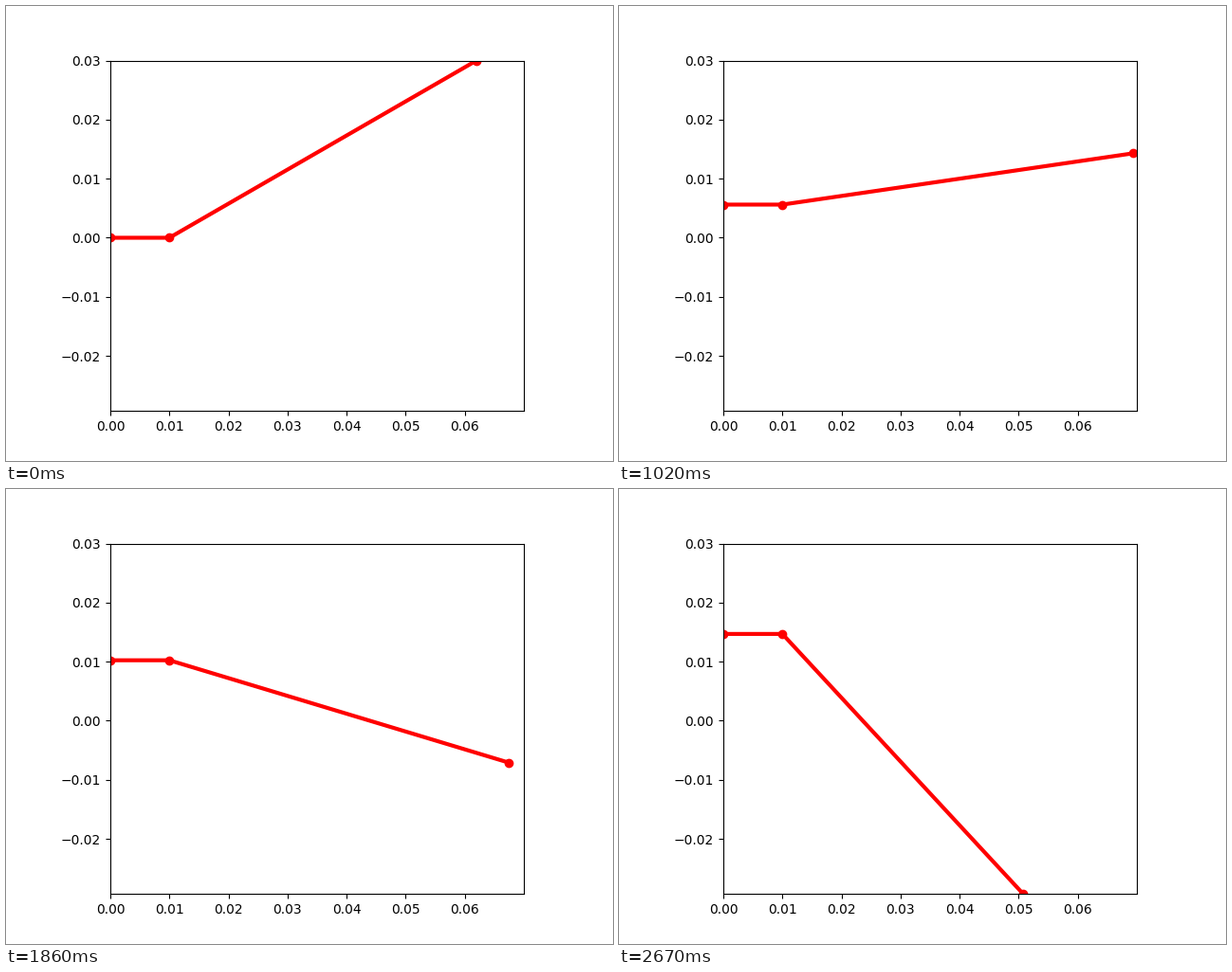
These frames come from a looping animation (640 px wide and 480 px high, 2.7 s). A matplotlib script:

```python
import numpy as np
import matplotlib.pyplot as plt
from matplotlib.animation import FuncAnimation
from matplotlib.ticker import MultipleLocator

FRAMES = 90
INTERVAL = 30          # ms

BASE = 0.01            # length of the level link
ROD = 0.06             # length of the swinging link
LIFT = 0.0001652       # rise of the level link per frame
START = 30.0           # rod angle in degrees
SPIN = 0.4955          # angular speed, degrees per frame
GAIN = 0.00418         # half the angular acceleration


def joints(k):
    """Coordinates of the three joints at frame k."""
    height = LIFT * k
    angle = np.radians(START - SPIN * k - GAIN * k ** 2)
    x = [0, BASE, BASE + ROD * np.cos(angle)]
    y = [height, height, height + ROD * np.sin(angle)]
    return x, y


fig, ax = plt.subplots(figsize=(6.4, 4.8), dpi=100)
tips = np.array([[c[2] for c in joints(k)] for k in range(FRAMES)])

# The view is bounded by the reach of the tip.
ax.set_xlim(0, tips[:, 0].max())
ax.set_ylim(tips[:, 1].min(), ROD * np.sin(np.radians(START)))
ax.set_aspect("equal")
ax.xaxis.set_major_locator(MultipleLocator(0.01))
ax.yaxis.set_major_locator(MultipleLocator(0.01))

linkage, = ax.plot(*joints(0), "o-", color="red", lw=3)


def update(k):
    linkage.set_data(*joints(k))
    return linkage,


anim = FuncAnimation(fig, update, frames=FRAMES, interval=INTERVAL,
                     repeat=True, repeat_delay=0)
plt.show()
```
